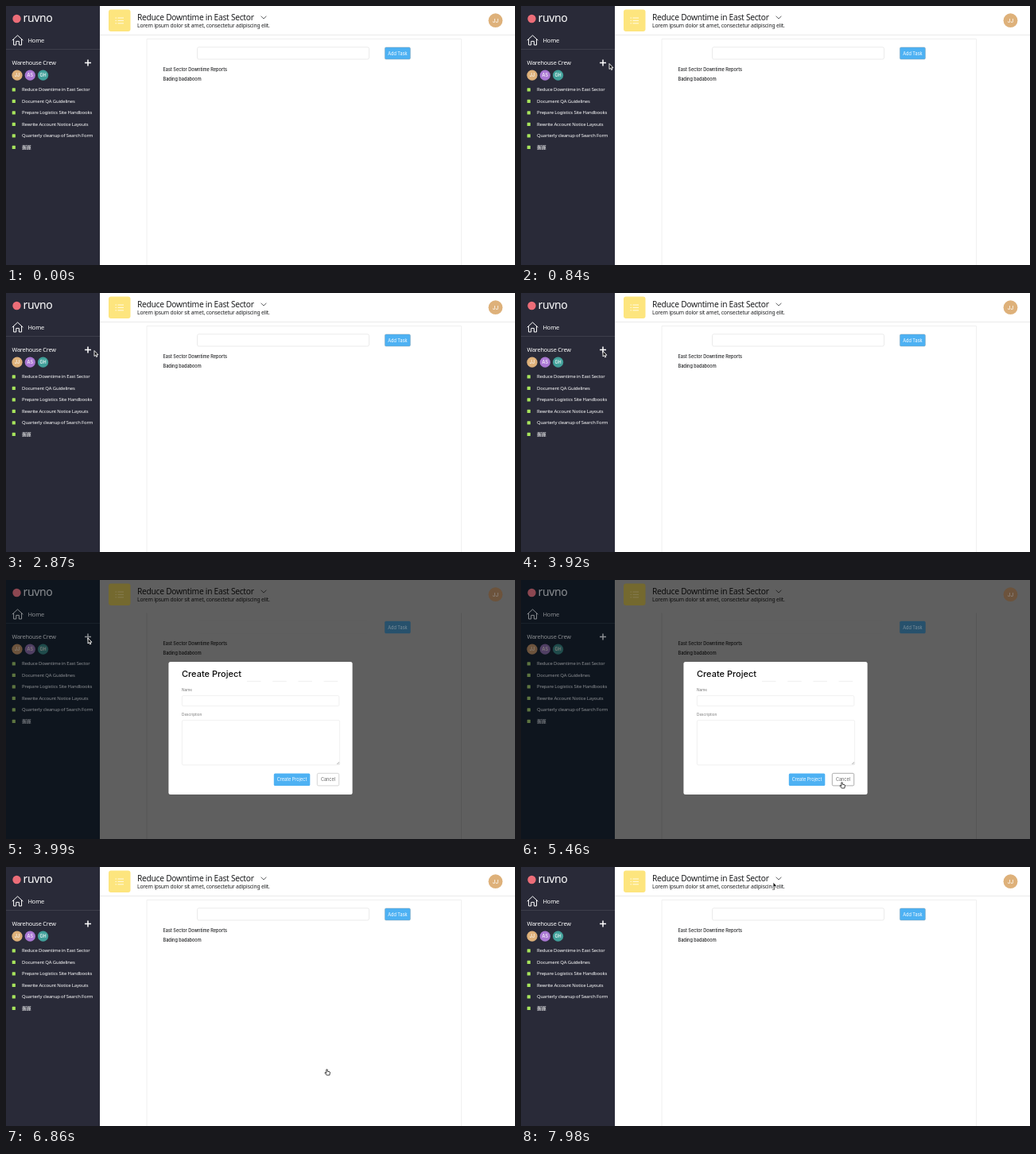
An HTML page for the animation above (8000 ms loop, 640 by 326 pixels).

```html
<!DOCTYPE html>
<html lang="en">
<head>
<meta charset="utf-8">
<title>Task board</title>
<style>
  html, body { margin: 0; height: 100%; overflow: hidden; background: #fff; }
  svg {
    display: block; width: 100vw; height: 100vh;
    --page: #fff; --side: #292a38; --sideText: #fff; --sideLine: #3d3e4b; --ink: #1e1f21;
    --line: #ebebeb; --card: #ececec; --blue: #4db1f3; --blueText: #fff; --blueEdge: #7f9fb3;
    --yellow: #fde57e; --icon: #fffbe6; --coral: #ec6d78; --green: #a6e35c;
    --sand: #deb17a; --violet: #aa78d3; --teal: #41a09a; --initials: #fff;
  }
  svg.dimmed {
    --page: #5f5f5f; --side: #0e151e; --sideText: #8b8e92; --sideLine: #19212a; --ink: #0c0c0c;
    --line: #5f5f5f; --card: #555; --blue: #27516c; --blueText: #7d909c; --blueEdge: #27516c;
    --yellow: #74692f; --icon: #857b50; --coral: #8c4751; --green: #5c7440;
    --sand: #6c533c; --violet: #503f63; --teal: #1f4b4b; --initials: #8f8882;
  }
  svg.dimmed #cardTop { display: none; }
  text { font-family: Inter, sans-serif; font-size: 5.55px; fill: var(--ink); }
  .humanist { font-family: "Noto Sans", "Noto Sans CJK SC", "Noto Sans CJK", sans-serif; letter-spacing: -.025em; }
  .side text { fill: var(--sideText); }
  .mid, .initials { text-anchor: middle; }
  .side .initials, .initials { fill: var(--initials); font-weight: 500; }
  .stroke { fill: none; stroke: var(--sideText); }
  .task { font-weight: 500; }
  .label { font-size: 4.7px; fill: #777; }
  .field { fill: #fff; stroke: #ececec; stroke-width: .8; }
  #cancel rect { fill: #fff; stroke: #ccc; stroke-width: .8; }
  #cancel text { fill: #666; }
  #cancel.hover rect { stroke: #999; }
</style>
</head>
<body>
<svg id="stage" viewBox="0 0 640 326" preserveAspectRatio="none">
  <rect width="640" height="326" fill="var(--page)"/>

  <g class="side">
    <rect width="118" height="326" fill="var(--side)"/>
    <circle cx="13.5" cy="16" r="5.2" fill="var(--coral)"/>
    <text class="humanist" x="21.5" y="19.8" style="font-size:14px">ruvno</text>
    <path class="stroke" d="M7.8 43.2 14.6 37 21.4 43.2M9.6 42V49H12.8V44.4H16.4V49H19.6V42"/>
    <text class="humanist" x="27.5" y="46.2" style="font-size:7.5px;font-weight:500">Home</text>
    <path d="M0 54.5H118" stroke="var(--sideLine)"/>
    <text class="humanist" x="7.5" y="74.2" style="font-size:7.3px;font-weight:500">Warehouse Crew</text>
    <path class="stroke" d="M99 71.6H107M103 67.6V75.6" stroke-width="1.5"/>
    <g id="members"></g>
    <g id="projects"></g>
  </g>

  <rect x="129" y="4.5" width="27.5" height="27.5" rx="3" fill="var(--yellow)"/>
  <path d="M137.5 15H139M140.5 15H148M137.5 18.4H139M140.5 18.4H148M137.5 21.8H139M140.5 21.8H148" stroke="var(--icon)"/>
  <text class="humanist" x="165" y="17.7" style="font-size:10.2px">Reduce Downtime in East Sector</text>
  <path d="M320.6 12.7 324 16.1 327.4 12.7" fill="none" stroke="var(--ink)" stroke-width=".7"/>
  <text class="humanist" x="165" y="27.4" style="font-size:6.77px">Lorem ipsum dolor sit amet, consectetur adipiscing elit.</text>
  <circle cx="615.5" cy="18.2" r="8.9" fill="var(--sand)"/>
  <text class="initials" x="615.5" y="20.6" style="font-size:6.5px">JJ</text>
  <path d="M118 36.5H640" stroke="var(--line)"/>

  <path d="M177 326V41.5M572.5 41.5V326" stroke="var(--card)" stroke-width=".8"/>
  <path id="cardTop" d="M177 41.5H572.5" stroke="var(--card)" stroke-width=".8"/>
  <rect x="240.5" y="51.8" width="216" height="15.2" rx="2" fill="none" stroke="var(--line)"/>
  <rect x="476.4" y="52" width="32" height="15" rx="1.5" fill="var(--blue)" stroke="var(--blueEdge)" stroke-width=".5"/>
  <text class="mid" x="492.4" y="61.6" style="fill:var(--blueText)">Add Task</text>
  <text class="task" x="197.5" y="82">East Sector Downtime Reports</text>
  <text class="task" x="197.5" y="94.2">Bading badaboom</text>

  <g id="modal">
    <rect x="204.4" y="103" width="231.2" height="167" rx="2.5" fill="#fff"/>
    <text x="221" y="122" style="font-size:11px;font-weight:500">Create Project</text>
    <path d="M303 127.5H419" stroke="#ececec" stroke-width=".8" stroke-dasharray="17.5 14.7"/>
    <text class="label" x="221" y="140.2">Name</text>
    <rect class="field" x="221.4" y="145.6" width="197.4" height="13" rx="1.5"/>
    <text class="label" x="221" y="170.8">Description</text>
    <rect class="field" x="221.4" y="176.6" width="198.2" height="56.2" rx="1.5"/>
    <path d="M416 232 419 229M417.8 232 419 230.8" stroke="#888" stroke-width=".6"/>
    <rect x="336.8" y="243.4" width="45.5" height="15.6" rx="1.5" fill="#4db1f3"/>
    <text class="mid" x="359.5" y="253" style="fill:#fff">Create Project</text>
    <g id="cancel">
      <rect x="391.3" y="243.3" width="27.4" height="15.6" rx="1.5"/>
      <text class="mid" x="405" y="253">Cancel</text>
    </g>
  </g>

  <circle id="ring" cx="404" cy="255" r="12.6" fill="none" stroke="#000" stroke-width="1.4"/>
  <g id="cursor">
    <path id="arrow" d="M0 0V7L1.6 5.6 2.7 8 3.8 7.5 2.8 5.2H4.9Z" fill="#111" stroke="#fff" stroke-width=".9"/>
    <path id="hand" d="M-1.2 1.5V-3Q-.5-4 .2-3V-.8L3-.2Q3.6 0 3.4 1L2.8 4H-.8L-3 1.2Q-3 .2-2 .7Z" fill="#fff" stroke="#111" stroke-width=".8"/>
  </g>
</svg>
<script>
  const LOOP = 8000, OPEN = 3960, CLOSE = 6830, CLICK = 6650;
  const $ = id => document.getElementById(id);

  const members = [["JJ", "sand"], ["AS", "violet"], ["GH", "teal"]];
  $("members").innerHTML = members.map(([name, color], i) => {
    const x = 14 + 16.3 * i;
    return `<circle cx="${x}" cy="87.2" r="6.6" fill="var(--${color})"/>
      <text class="initials" x="${x}" y="89.2">${name}</text>`;
  }).join("");

  const projects = [
    "Reduce Downtime in East Sector", "Document QA Guidelines",
    "Prepare Logistics Site Handbooks", "Rewrite Account Notice Layouts",
    "Quarterly cleanup of Search Form", "握握"
  ];
  $("projects").innerHTML = projects.map((name, i) => {
    const y = 105.3 + 14.5 * i;
    return `<rect x="7.7" y="${y - 2}" width="4.2" height="4.2" rx=".6" fill="var(--green)"/>
      <text class="humanist" x="20" y="${y + 2.1}" style="font-size:5.95px;font-weight:500">${name}</text>`;
  }).join("");

  // Cursor stops: time, x, y
  const path = [
    [70, 150, 330], [840, 111, 72.5], [2900, 111, 72.5], [3500, 103, 73],
    [4200, 103, 73], [4950, 404, 258], [7200, 404, 258], [7980, 317, 19]
  ];
  const ease = p => p * p * (3 - 2 * p);

  function cursorAt(t) {
    const next = path.findIndex(stop => stop[0] > t);
    if (next < 0) return path[path.length - 1].slice(1);
    if (next === 0) return path[0].slice(1);
    const [t0, x0, y0] = path[next - 1], [t1, x1, y1] = path[next];
    const p = ease((t - t0) / (t1 - t0));
    return [x0 + (x1 - x0) * p, y0 + (y1 - y0) * p];
  }

  const show = (id, on) => $(id).setAttribute("visibility", on ? "visible" : "hidden");

  function draw() {
    const t = performance.now() % LOOP;
    const modal = t >= OPEN && t < CLOSE;
    const pointing = t >= 4900 && t < 7220;
    const [x, y] = cursorAt(t);
    $("stage").classList.toggle("dimmed", modal);
    $("cancel").classList.toggle("hover", pointing);
    $("cursor").setAttribute("transform", `translate(${x} ${y})`);
    show("modal", modal);
    show("ring", t >= CLICK && t < CLOSE);
    show("arrow", !pointing);
    show("hand", pointing);
    requestAnimationFrame(draw);
  }
  draw();
</script>
</body>
</html>
```
